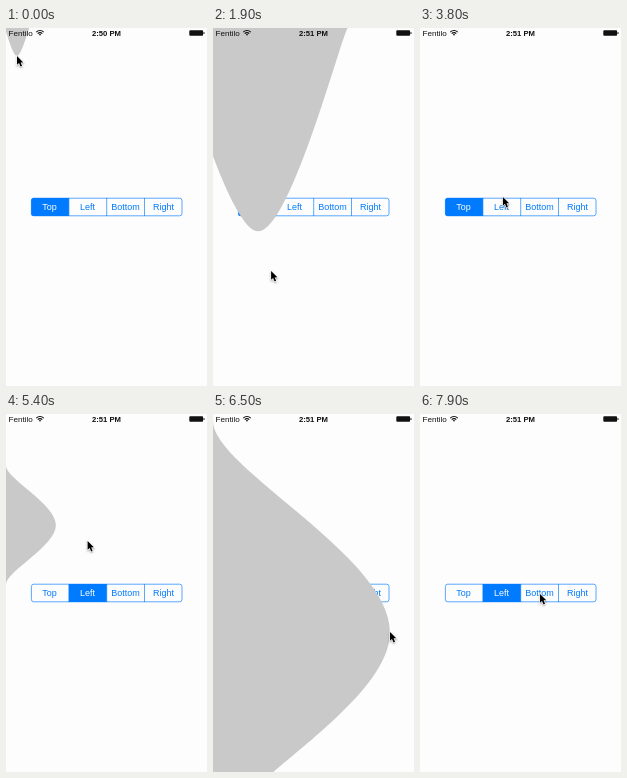
These frames come from a looping animation (201x358 px, 8000 ms). An HTML page with a canvas:

```html
<!DOCTYPE html>
<html lang="en">
<head>
<meta charset="utf-8">
<style>
  html, body { margin: 0; width: 100%; height: 100%; overflow: hidden; background: #fdfdfd; }
  canvas { display: block; width: 201px; height: 358px; }
</style>
</head>
<body>
<canvas></canvas>
<script>
const LOOP = 8000, W = 201, H = 358;
const BLUE = '#007aff', PAPER = '#fdfdfd', GRAY = '#c9c9c9', INK = '#111';
const FONT = '"Liberation Sans", Arial, sans-serif';
const canvas = document.querySelector('canvas');
const ctx = canvas.getContext('2d');
const ratio = window.devicePixelRatio || 1;
canvas.width = W * ratio;
canvas.height = H * ratio;
ctx.scale(ratio, ratio);

// One drag per edge: pos runs along the edge, depth away from it.
const topPull = {
  start: 0, peak: 2400, release: 2400,
  pos: [11, 66], depth: [28, 253], spread: 0.44, shoulder: 0.95
};
const leftPull = {
  start: 4960, peak: 6400, release: 6850, sideways: true,
  pos: [100, 218], depth: [0, 177], spread: 1.19, shoulder: 0.78
};

// Stops of the mouse: time, x, y
const stops = [
  [0, 11, 28], [1200, 31, 158], [1950, 60, 249], [2500, 107, 216], [3800, 83, 169],
  [4960, 2, 95], [5400, 81.5, 127], [6400, 177, 218], [6850, 177, 218], [7900, 120, 180]
];

const clamp = v => Math.min(1, Math.max(0, v));
const mix = (a, b, k) => a + (b - a) * k;

function cursorAt(time) {
  const next = stops.findIndex(stop => stop[0] > time);
  if (next < 0) return stops.at(-1).slice(1);
  const [t0, x0, y0] = stops[next - 1], [t1, x1, y1] = stops[next];
  const k = (time - t0) / (t1 - t0);
  return [mix(x0, x1, k), mix(y0, y1, k)];
}

// Grows with the drag, then pinches at the base and snaps back.
function drawBulge(pull, time) {
  const grow = clamp((time - pull.start) / (pull.peak - pull.start));
  const snap = clamp((time - pull.release) / 900);
  if (grow === 0 && time < pull.start || snap === 1) return;
  const pos = mix(...pull.pos, grow ** 2);
  const pulled = mix(...pull.depth, grow ** 1.07);
  const depth = pulled * (1 - snap ** 3);
  const half = pulled * pull.spread * (1 + 0.2 * snap);
  const shoulder = half * pull.shoulder * Math.max(0, 1 - 8 * snap);
  const tip = half * 0.36;

  ctx.save();
  if (pull.sideways) ctx.transform(0, 1, 1, 0, 0, 0);
  ctx.fillStyle = GRAY;
  ctx.beginPath();
  ctx.moveTo(pos - half, 0);
  ctx.bezierCurveTo(pos - shoulder, 0, pos - tip, depth, pos, depth);
  ctx.bezierCurveTo(pos + tip, depth, pos + shoulder, 0, pos + half, 0);
  ctx.fill();
  ctx.restore();
}

function text(str, x, y, font, color, align = 'center') {
  ctx.font = `${font} ${FONT}`;
  ctx.fillStyle = color;
  ctx.textAlign = align;
  ctx.fillText(str, x, y);
}

function drawSegments(selected) {
  const left = 25.1, top = 169.9, width = 151.2, height = 18.2, cell = width / 4;
  ctx.strokeStyle = ctx.fillStyle = BLUE;
  ctx.lineWidth = 0.65;
  ctx.save();
  ctx.beginPath();
  ctx.roundRect(left, top, width, height, 2.5);
  ctx.clip();
  ctx.fillRect(left + selected * cell, top, cell, height);
  ctx.restore();
  ctx.beginPath();
  ctx.roundRect(left + 0.3, top + 0.3, width - 0.6, height - 0.6, 2.3);
  for (let i = 1; i < 4; i++) {
    ctx.moveTo(left + i * cell, top);
    ctx.lineTo(left + i * cell, top + height);
  }
  ctx.stroke();
  ['Top', 'Left', 'Bottom', 'Right'].forEach((label, i) =>
    text(label, 43.4 + i * 38, 182, '9px', i === selected ? PAPER : BLUE));
}

function drawStatus(clock) {
  text('Fentilo', 2.5, 7.6, '8.1px', INK, 'left');
  text(clock, 100.5, 7.6, 'bold 7.7px', INK);
  ctx.strokeStyle = ctx.fillStyle = INK;
  ctx.lineWidth = 1.1;
  const fan = r => ctx.arc(34, 7.8, r, -Math.PI * 0.75, -Math.PI * 0.25);
  for (const r of [3.2, 5.3]) {
    ctx.beginPath();
    fan(r);
    ctx.stroke();
  }
  ctx.beginPath();
  ctx.moveTo(34, 7.8);
  fan(1.7);
  ctx.fill();
  ctx.beginPath();
  ctx.roundRect(183.3, 2.2, 13.8, 5.6, 1);
  ctx.roundRect(197.5, 4, 1, 2, 0.5);
  ctx.fill();
}

const arrow = new Path2D('M0 0V9.2L2.1 7.3 3.7 11 5.3 10.3 3.8 6.7 6.6 6.6Z');

function drawCursor([x, y]) {
  ctx.save();
  ctx.translate(x, y);
  ctx.scale(0.95, 0.95);
  ctx.shadowColor = 'rgba(0,0,0,0.35)';
  ctx.shadowBlur = 2 * ratio;
  ctx.shadowOffsetY = ratio;
  ctx.strokeStyle = '#fff';
  ctx.lineWidth = 1.2;
  ctx.stroke(arrow);
  ctx.shadowColor = 'transparent';
  ctx.fillStyle = '#000';
  ctx.fill(arrow);
  ctx.restore();
}

function render(time) {
  ctx.fillStyle = PAPER;
  ctx.fillRect(0, 0, W, H);
  drawSegments(time < 4000 ? 0 : 1);
  drawBulge(topPull, time);
  drawBulge(leftPull, time);
  drawStatus(time < 600 ? '2:50 PM' : '2:51 PM');
  drawCursor(cursorAt(time));
}

const start = performance.now();
function tick() {
  render((performance.now() - start) % LOOP);
  requestAnimationFrame(tick);
}
tick();
</script>
</body>
</html>
```
